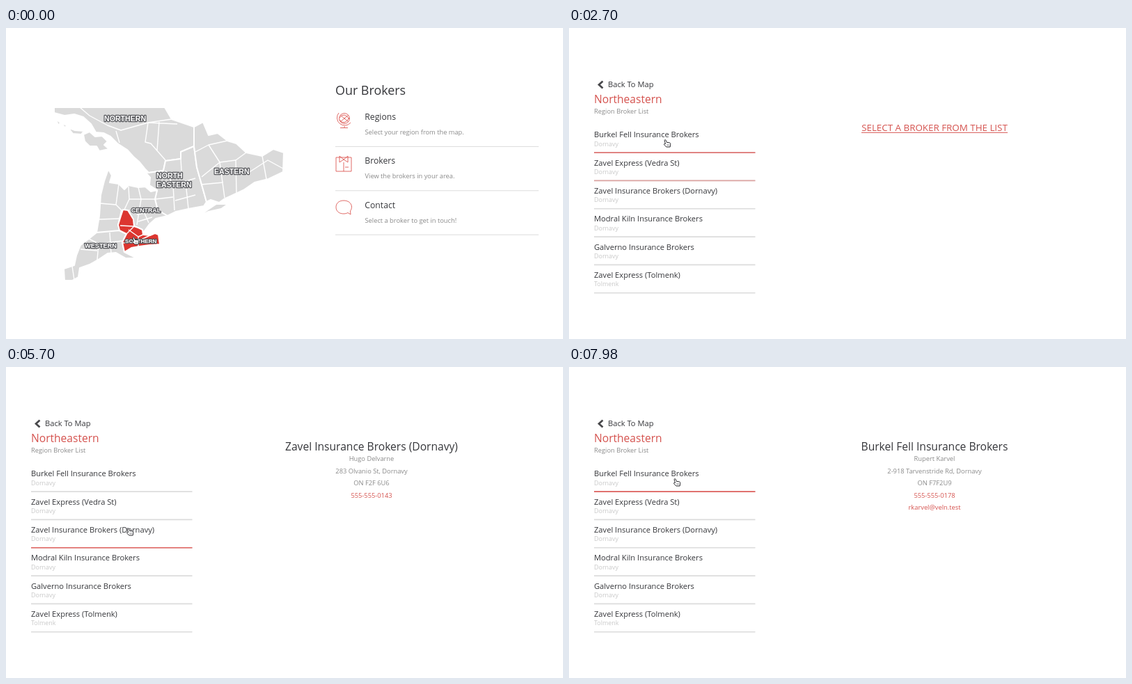
These frames come from a looping animation (800x447 px, 8000 ms). An HTML page:

```html
<!DOCTYPE html>
<html lang="en">
<head>
<meta charset="utf-8">
<title>Broker finder</title>
<style>
html, body { margin: 0; width: 100%; height: 100%; overflow: hidden; background: #fff; }
svg { display: block; width: 100%; height: 100%; font-family: "Open Sans", sans-serif; }
.dark { fill: #36373b; }
.grey { fill: #8a8a8a; }
.pale { fill: #c9c9c9; }
.red { fill: #d5534f; }
.s9 { font-size: 9.3px; }
.s11 { font-size: 11.15px; }
.s12 { font-size: 12.2px; }
.s15 { font-size: 15.6px; }
.mid { text-anchor: middle; }
.rule { stroke: #dcdcdc; }
.icon { fill: none; stroke: #dd5a55; stroke-width: .9; stroke-linejoin: round; }

.region { fill: #dadada; stroke: #fff; stroke-width: 2; stroke-linejoin: round; }
.borders { fill: none; stroke: #fff; stroke-width: 1.4; stroke-linejoin: round; }
.labels { font: bold 10.6px "Liberation Sans", Arial, sans-serif; fill: #fff;
  stroke: #55565a; stroke-width: 2.4; stroke-linejoin: round; paint-order: stroke; }

.map, .list, .prompt, .cardA, .cardB, .hover, .cursor, .south, .central, .northeast {
  animation: 8s ease-in-out infinite both; }
.south, .central, .northeast { animation-timing-function: step-end; }
.map { animation-name: map; }
.list { animation-name: list; }
.prompt { animation-name: prompt; }
.cardA { animation-name: cardA; }
.cardB { animation-name: cardB; }
.cursor { animation-name: cursor; }
.south { animation-name: south; }
.central { animation-name: central; }
.northeast { animation-name: northeast; }
.hover { stroke: #e0625f; stroke-width: 1.7; animation-timing-function: linear; }
.hover0 { animation-name: hover0; }
.hover1 { animation-name: hover1; }
.hover2 { animation-name: hover2; }

@keyframes map { 0%, 11.5% { opacity: 1 } 16.1%, 100% { opacity: 0 } }
@keyframes list { 0%, 16.1% { opacity: 0 } 22.5%, 100% { opacity: 1 } }
@keyframes prompt { 0%, 53.1% { opacity: 1 } 55.6%, 100% { opacity: 0 } }
@keyframes cardA { 0%, 57% { opacity: 0 } 62%, 91.75% { opacity: 1 } 94.5%, 100% { opacity: 0 } }
@keyframes cardB { 0%, 94.75% { opacity: 0 } 99.5%, 100% { opacity: 1 } }
@keyframes south { 0% { fill: #dc3630 } 3.75%, 100% { fill: #dadada } }
@keyframes central { 0% { fill: #dadada } 3.75% { fill: #dc3630 } 5.25%, 100% { fill: #dadada } }
@keyframes northeast { 0% { fill: #dadada } 5.25%, 100% { fill: #dc3630 } }
@keyframes hover0 {
  0%, 30% { opacity: 0 } 34.5%, 45% { opacity: 1 } 49%, 80% { opacity: 0 } 84%, 100% { opacity: 1 } }
@keyframes hover1 {
  0%, 31% { opacity: 1 } 36%, 45% { opacity: 0 } 47.5% { opacity: .8 } 51%, 77% { opacity: 0 }
  79.5% { opacity: .8 } 83%, 100% { opacity: 0 } }
@keyframes hover2 { 0%, 47.5% { opacity: 0 } 52%, 77% { opacity: 1 } 81.5%, 100% { opacity: 0 } }
@keyframes cursor {
  0%, .75% { transform: translate(186px, 306px) }
  9.75%, 29% { transform: translate(246px, 221px) }
  33%, 42.75% { transform: translate(141px, 166px) }
  51.25%, 64.5% { transform: translate(153px, 242px) }
  70%, 75% { transform: translate(178px, 237px) }
  83.75%, 100% { transform: translate(155px, 166px) }
}
</style>
</head>
<body>
<svg viewBox="0 0 800 447">
  <g class="map">
    <path class="region" d="M69 114H228L238 131 270 142 270 170 251 178 251 188 229 191 226 205 205 208 200 203 191 192 183 185 174 175 160 166 150 156 140 151 129 150 122 138 111 128 98 124 84 126 69 122Z"/>
    <path class="region" d="M111 153 120 149 128 156 138 155 146 163 141 168 148 174 134 177 130 170 120 170 113 163ZM89 143 99 147 112 148 108 153 96 152ZM72 131 78 136 75 140ZM80 136 88 141 84 143Z"/>
    <path class="region northeast" d="M229 191 251 188 251 178 270 170 274 200 288 250 284 256 262 260 244 264 232 270 218 262 214 246 217 233 206 226 207 215 200 207 205 208 226 205Z"/>
    <path class="region" d="M270 142 283 135 291 154 304 151 318 162 331 166 345 179 368 184 384 174 399 179 398 207 377 217 357 222 341 233 326 240 313 246 306 251 294 247 288 250 274 200 270 170ZM275 272 290 261 302 253 319 253 309 260 291 264Z"/>
    <path class="region central" d="M147 203 152 212 149 222 162 224 170 232 176 226 190 229 200 228 208 235 217 233 214 246 218 262 232 270 215 274 206 282 198 293 184 285 176 262 166 262 161 283 165 293 130 294 134 270 136 240 141 220Z"/>
    <path class="region" d="M130 294 163 291 173 296 167 308 170 322 188 331 172 331 158 323 146 324 134 332 120 340 106 345 104 358 95 363 84 363 83 346 98 341 101 327 107 312 119 303Z"/>
    <path class="region south" d="M168 261 175 262 183 275 184 285 190 287 196 290 197 297 207 298 214 295 219 297 221 311 206 312 191 314 180 316 170 322 167 308 173 296 163 291 161 283 165 270Z"/>
    <g class="borders">
      <path d="M106 114 120 126 146 140 165 147 204 136 238 131M158 148 163 165M204 136 200 164 208 166 229 190M204 136 246 138M220 135 217 176"/>
      <path d="M229 205 240 226 272 216M251 188 252 205M240 226 242 262M214 246 240 243M272 240 243 248M258 222 262 260"/>
      <path d="M272 178 291 168 318 162M291 168 307 193 281 214M307 193 330 190 345 179M330 190 331 237M307 193 314 244M345 210 376 190 398 202M368 184 374 217M280 225 312 222"/>
      <path d="M135 252 158 254 166 262M162 224 158 254M176 228 177 246 170 261M177 246 214 246M190 229 194 246 188 283M134 275 163 274M188 268 216 263M198 264 205 280M190 278 210 272"/>
      <path d="M119 303 133 310 131 333M133 310 167 306M149 294 151 324M107 318 131 320M164 284 184 285 173 296M176 290 190 300 197 297M190 300 190 314M168 309 190 306 207 298M95 342 98 362"/>
    </g>
    <g class="labels">
      <text x="141" y="134">NORTHERN</text>
      <text x="216" y="216">NORTH</text>
      <text x="216" y="229">EASTERN</text>
      <text x="299" y="210">EASTERN</text>
      <text x="180" y="265" font-size="8.8">CENTRAL</text>
      <text x="113" y="316" font-size="9.2">WESTERN</text>
      <text x="171" y="309" font-size="8.1">SOUTHERN</text>
    </g>

    <text class="dark" x="473" y="96" font-size="17.9">Our Brokers</text>
    <g id="steps"></g>
    <g class="icon">
      <circle cx="486" cy="130" r="7.4"/>
      <path d="M480 125 492 135M480 135 492 125M479 129Q486 120 493 131M479 132Q486 141 493 129M478 122A11 11 0 1 0 495 136M486 141V143M480 143.500H491"/>
      <path d="M474 186H496V206H474ZM485 193V206M479 184 485 189 491 184V193L485 189 479 193ZM487 200H492"/>
      <path d="M485 248C478 248 474 252 474 257.500S478 267 485 267C488 267 490 266 491 265.500L495 268 494.500 263C496 261 496.500 259 496.500 257C496 251 491 248 485 248Z"/>
    </g>
  </g>

  <g class="list">
    <path d="M48.500 76.500 43 81.500 48.500 86.500" fill="none" stroke="#48484b" stroke-width="2.700"/>
    <text class="dark s11" x="56" y="85.300">Back To Map</text>
    <text class="red s15" x="36" y="107.600">Northeastern</text>
    <text class="grey s9" x="36" y="123">Region Broker List</text>
    <g id="rows"></g>
    <g class="prompt">
      <text class="red mid" x="525" y="148" font-size="13.370">SELECT A BROKER FROM THE LIST</text>
      <path d="M420 150.300H630" stroke="#d5534f"/>
    </g>
    <g id="cards"></g>
  </g>

  <g class="cursor">
    <path d="M-4-4.500Q-3-6.200-1.800-4.700L-.600-1.600 3.300-1.200Q4.800-.800 4.800.800L4.200 5H-1.200L-4.600 1.400Q-4.600-.200-2.500.600Z"
      fill="#fff" stroke="#2c2c30" stroke-linejoin="round"/>
    <path d="M.200 1V3.500M2.200 1V3.500" stroke="#55555a" stroke-width=".7"/>
  </g>
</svg>
<script>
const steps = [
  ["Regions", "Select your region from the map."],
  ["Brokers", "View the brokers in your area."],
  ["Contact", "Select a broker to get in touch!"]
];
const brokers = [
  ["Burkel Fell Insurance Brokers", "Dornavy"],
  ["Zavel Express (Vedra St)", "Dornavy"],
  ["Zavel Insurance Brokers (Dornavy)", "Dornavy"],
  ["Modral Kiln Insurance Brokers", "Dornavy"],
  ["Galverno Insurance Brokers", "Dornavy"],
  ["Zavel Express (Tolmenk)", "Tolmenk"]
];
const cards = {
  cardA: [brokers[2][0], "Hugo Delvarne", "283 Olvanio St, Dornavy", "ON F2F 6U6", "555-555-0143"],
  cardB: [brokers[0][0], "Rupert Karvel", "2-918 Tarvenstride Rd, Dornavy", "ON F7F2U9",
    "555-555-0178", "rkarvel@veln.test"]
};
const fill = (id, html) => document.getElementById(id).innerHTML = html;
const text = (cls, x, y, str) => `<text class="${cls}" x="${x}" y="${y}">${str}</text>`;

fill("steps", steps.map(([title, hint], i) => {
  const y = i * 63.4;
  return text("dark s12", 515.3, 131.7 + y, title) + text("grey s9", 515.5, 153 + y, hint) +
    `<path class="rule" d="M473 ${170.4 + y}H765"/>`;
}).join(""));

fill("rows", brokers.map(([name, town], i) => {
  const y = i * 40.33, line = `d="M36 ${179.1 + y}H267.500"`;
  return text("dark s11", 36, 157.2 + y, name) +
    `<g font-size="8.95">${text("pale", 36, 169.8 + y, town)}</g>` +
    `<path class="rule" stroke-width="1.7" ${line}/>` +
    (i < 3 ? `<path class="hover hover${i}" ${line}/>` : "");
}).join(""));

fill("cards", Object.entries(cards).map(([cls, [name, ...lines]]) =>
  `<g class="${cls}">` + text("dark s15 mid", 525, 119.8, name) +
  lines.map((str, i) => text(`${i < 3 ? "grey" : "red"} s9 mid`, 525, 135.3 + i * 17.4, str)).join("") +
  "</g>").join(""));
</script>
</body>
</html>
```
